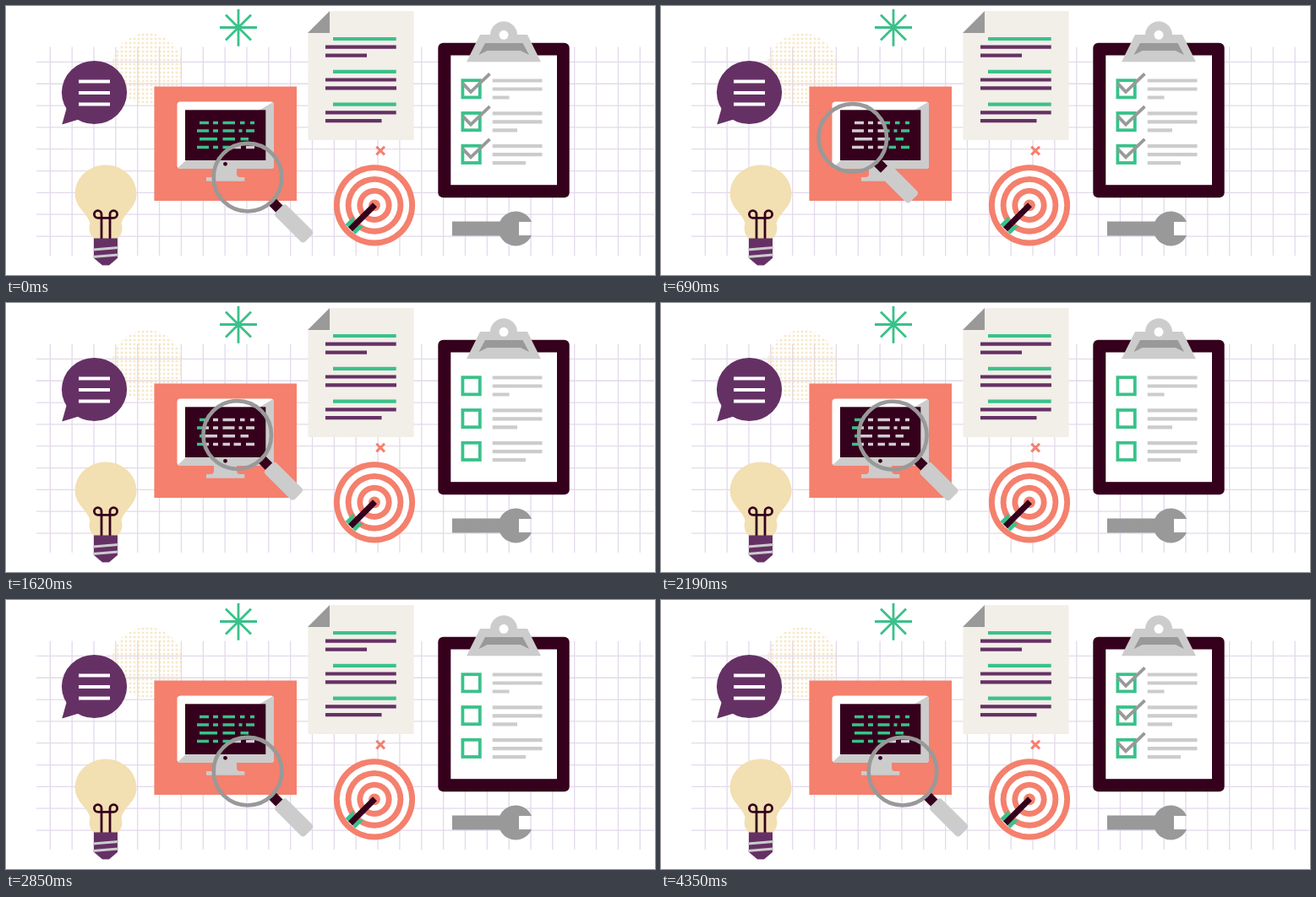
An HTML page that plays this animation: 768 px wide and 319 px high, repeating every 5400 ms.

```html
<!DOCTYPE html>
<html lang="en">
<head>
<meta charset="utf-8">
<title>Project review</title>
<style>
  html, body { margin: 0; width: 100%; height: 100%; overflow: hidden; background: #fff; }
  svg { display: block; width: 100vw; height: 100vh; }
  .orange { fill: #f4806d; }
  .purple { fill: #653165; }
  .dark { fill: #35001c; }
  .sand { fill: #f2dfb2; }
  .mid { fill: #999; }
  .pale { fill: #ccc; }
  .white { fill: #fff; }
  .line { fill: none; }
</style>
</head>
<body>
<svg viewBox="0 0 768 319" xmlns="http://www.w3.org/2000/svg">
  <defs>
    <pattern id="dots" x="164.5" y="71.5" width="5" height="5" patternUnits="userSpaceOnUse">
      <circle class="sand" cx="2.5" cy="2.5" r="1.25"/>
    </pattern>
    <clipPath id="lensClip"><circle id="lensHole" r="40"/></clipPath>
  </defs>

  <path id="grid" class="line" stroke="#e3d9ec" stroke-width="1.3"/>
  <circle cx="167" cy="74" r="42" fill="url(#dots)"/>

  <!-- speech bubble -->
  <ellipse class="purple" cx="104.5" cy="102.5" rx="38.6" ry="37.5"/>
  <path class="purple" d="M72 120L66.3 140.5L91 133Z"/>
  <path class="line" stroke="#fff" stroke-width="4" d="M86 89.5H123M86 103H123M86 116.5H123"/>

  <!-- spark -->
  <path class="line" stroke="#3ac18a" stroke-width="2.8" d="M253 25.5H297M275 3.7V47.7M260 10.5L290 40.5M290 10.5L260 40.5"/>

  <!-- light bulb -->
  <path class="sand" d="M118 188.5C138.500 188.500 154.500 204 154.500 223C154.500 239 139 246 136.500 258C138.500 264 137.500 271 132 276H104C98.500 271 97.500 264 99.500 258C97 246 81.700 239 81.700 223C81.700 204 97.500 188.500 118 188.500Z"/>
  <path class="line" stroke="#35001c" stroke-width="2.8" d="M113 276V247A4.300 4.300 0 1 0 108.700 251.300H127.300A4.300 4.300 0 1 0 123 247V276"/>
  <path class="purple" d="M104 275.500H132V299L122 307.500H114L104 299Z"/>
  <path class="line" stroke="#ccc" stroke-width="3.2" d="M103 289L133 286.500M103 297.500L133 295"/>

  <!-- document -->
  <path fill="#f2eee8" d="M383 6H482.500V159H357.500V32Z"/>
  <path class="mid" d="M383 6V32H357Z"/>
  <g id="copy" stroke-width="4.2"></g>

  <!-- small cross -->
  <path class="line" stroke="#f4806d" stroke-width="3" d="M438.300 166.700L448 176.400M448 166.700L438.300 176.400"/>

  <!-- target -->
  <g id="rings"></g>
  <path fill="#3ac18a" d="M401.500 259L411 249.500L413.300 259.300L422.800 261.300L413.300 270.800L407 264Z"/>
  <path class="line" stroke="#35001c" stroke-width="7" d="M436.500 235.800L407.500 264.800"/>

  <!-- clipboard -->
  <rect class="dark" x="511.3" y="43.8" width="155.4" height="183.4" rx="6"/>
  <rect class="white" x="526.3" y="58.5" width="125.7" height="153.7"/>
  <path class="pale" d="M561 34H617L633 66.300H545Z"/>
  <circle class="pale" cx="589" cy="34.300" r="16"/>
  <circle class="white" cx="589" cy="34.300" r="5.500"/>
  <path class="mid" d="M559.500 58L567 44H611.500L619 58L609 53H569.500Z"/>
  <g id="tasks"></g>

  <!-- wrench -->
  <path class="mid" d="M528 255.500H584.500A20.500 20.500 0 0 1 622 256H607V272H622A20.500 20.500 0 0 1 584.500 272.500H528Z"/>

  <!-- computer -->
  <rect class="orange" x="175.400" y="95.500" width="168.600" height="135.500"/>
  <path class="pale" d="M246 192V199Q246 203 242 203H237V207.700H282.300V203H277Q273 203 273 199V192Z"/>
  <rect class="white" x="202.500" y="113.500" width="114.500" height="79.500" rx="4"/>
  <path class="pale" d="M315.500 114.300Q317 115.300 317 117.500V189Q317 193 313 193H206.500Q204.500 193 203.500 191.700L213 183L299 124Z"/>
  <rect class="dark" x="212" y="123.300" width="95.300" height="59.700"/>
  <circle class="dark" cx="259.500" cy="187.300" r="2.400"/>
  <path class="code line" stroke="#3ac18a" stroke-width="3.500"/>
  <g clip-path="url(#lensClip)">
    <rect class="dark" x="222" y="134" width="76" height="38"/>
    <path class="code line" stroke="#d2ccd0" stroke-width="3.500"/>
  </g>

  <!-- magnifier -->
  <g id="lens">
    <g transform="rotate(45)">
      <rect class="dark" x="41" y="-5.800" width="14" height="11.600"/>
      <rect class="pale" x="52.700" y="-9.400" width="49.300" height="18.800" rx="4"/>
    </g>
    <circle class="line" r="40.300" stroke="#999" stroke-width="4.600"/>
  </g>
</svg>

<script>
const LOOP = 5400;
const GREEN = '#3ac18a', PURPLE = '#653165';
const $ = id => document.getElementById(id);

function add(parent, tag, attrs) {
  const el = document.createElementNS('http://www.w3.org/2000/svg', tag);
  for (const key in attrs) el.setAttribute(key, attrs[key]);
  return parent.appendChild(el);
}

function drawGrid() {
  let d = '';
  for (let i = 0; i < 28; i++) d += `M${52.3 + i * 25.85} 48.500V296`;
  for (let i = 0; i < 9; i++) d += `M36 ${66.4 + i * 25.83}H767`;
  $('grid').setAttribute('d', d);
}

function drawCopy() {
  [49, 49 + 0, 66.5].forEach((_, i) => {
    const y = 39 + i * 38.8;
    const end = i === 0 ? 427 : i === 1 ? 462 : 444.5;
    add($('copy'), 'path', { d: `M387 ${y}H461.700`, stroke: GREEN });
    add($('copy'), 'path', { d: `M378 ${y + 9.7}H461.700M378 ${y + 19.6}H${end}`, stroke: PURPLE });
  });
}

function drawRings() {
  for (let i = 7; i > 0; i--) {
    add($('rings'), 'circle', { cx: 436, cy: 236.3, r: i * 6.87, class: i % 2 ? 'orange' : 'white' });
  }
}

function drawTasks() {
  return [595.5, 605, 615].map((end, i) => {
    const row = add($('tasks'), 'g', { transform: `translate(0 ${i * 38.8})` });
    add(row, 'rect', { x: 540.4, y: 88.2, width: 20.4, height: 20.2, fill: '#fff', stroke: GREEN, 'stroke-width': 3.8 });
    add(row, 'path', { d: `M575.700 88.500H634.500M575.700 98.500H634.500M575.700 108.500H${end}`, stroke: '#ccc', 'stroke-width': 4.2 });
    return add(row, 'path', {
      d: 'M540.500 91.800L550 101.800L572.500 80.300', class: 'line',
      stroke: '#999', 'stroke-width': 3.8, pathLength: 1
    });
  });
}

function drawCode() {
  const rows = [
    [229, 240, 245, 251, 256.5, 271, 277, 282.5, 289, 294],
    [226, 240, 245, 251, 256.5, 270.5, 275.5, 279.5, 284, 294],
    [229, 250, 256.5, 271, 277.5, 287],
    [226, 240, 245, 251, 256.5, 265, 269.5, 278, 284, 294]
  ];
  let d = '';
  rows.forEach((row, i) => {
    for (let k = 0; k < row.length; k += 2) d += `M${row[k]} ${138.4 + i * 9.7}H${row[k + 1]}`;
  });
  document.querySelectorAll('.code').forEach(el => el.setAttribute('d', d));
}

const span = (t, from, to) => Math.min(1, Math.max(0, (t - from) / (to - from)));
const quart = u => u < 0.5 ? 8 * u ** 4 : 1 - 8 * (1 - u) ** 4;
const sine = u => (1 - Math.cos(Math.PI * u)) / 2;

function bezier(p, s) {
  const r = 1 - s;
  return [0, 1].map(k =>
    r ** 3 * p[0][k] + 3 * r * r * s * p[1][k] + 3 * r * s * s * p[2][k] + s ** 3 * p[3][k]);
}

// Lens route: sweep left, arc over the screen, drift slowly, drop back.
const HOME = [286, 203.2], LEFT = [226.7, 156.5], RIGHT = [273.5, 156.2], REST = [274.2, 157];
const legs = [
  { from: 20, to: 590, ease: quart, path: [HOME, [270, 203], [226, 188.5], LEFT] },
  { from: 590, to: 1342, ease: quart, path: [LEFT, [235, 141], [262, 141], RIGHT] },
  { from: 1342, to: 2110, ease: u => u, path: [RIGHT, RIGHT, REST, REST] },
  { from: 2110, to: 2840, ease: quart, path: [REST, [276.5, 171.5], [281.5, 188], HOME] }
];

function lensAt(t) {
  const leg = legs.find(l => t < l.to) || legs[legs.length - 1];
  return bezier(leg.path, leg.ease(span(t, leg.from, leg.to)));
}

function setCheck(el, i, t) {
  let scale = 1, drawn = 1;
  if (t < 2000) scale = 1 - quart(span(t, 590, 1260));
  else drawn = sine(span(t, 3680 + i * 155, 4035 + i * 155));
  const shown = scale > 0.002 && drawn > 0;
  el.setAttribute('visibility', shown ? 'visible' : 'hidden');
  el.setAttribute('transform', `translate(550 101.800) scale(${scale}) translate(-550 -101.800)`);
  el.setAttribute('stroke-dasharray', drawn < 1 ? `${drawn} 2` : 'none');
}

function render(t) {
  const [x, y] = lensAt(t);
  $('lens').setAttribute('transform', `translate(${x} ${y})`);
  $('lensHole').setAttribute('cx', x);
  $('lensHole').setAttribute('cy', y);
  checks.forEach((el, i) => setCheck(el, i, t));
}

drawGrid();
drawCopy();
drawRings();
drawCode();
const checks = drawTasks();

const start = performance.now();
function tick() {
  render((performance.now() - start) % LOOP);
  requestAnimationFrame(tick);
}
render(0);
requestAnimationFrame(tick);
</script>
</body>
</html>
```
